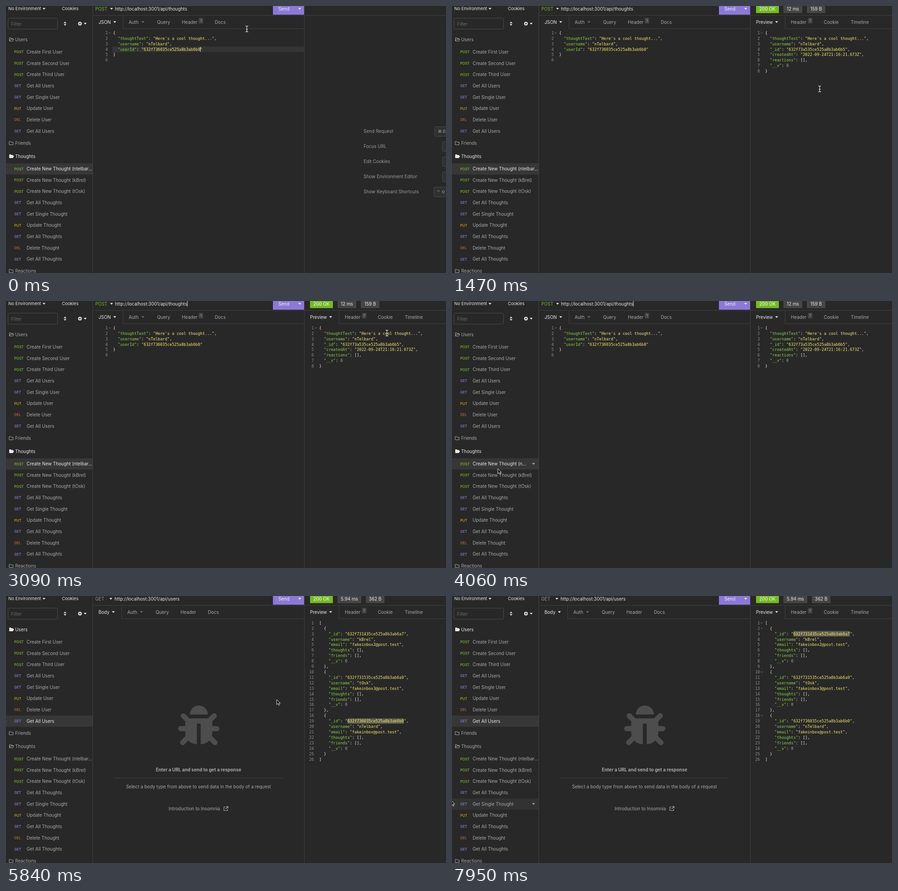
Animation of 961x583 px, one loop 8 s. Source, as an HTML page with a canvas:

```html
<!DOCTYPE html>
<html lang="en">
<head>
<meta charset="utf-8">
<title>API client</title>
<style>
html, body { margin: 0; width: 961px; height: 583px; overflow: hidden; background: #282828; }
canvas { display: block; }
</style>
</head>
<body>
<canvas id="stage" width="961" height="583"></canvas>
<script>
const c = document.getElementById('stage').getContext('2d');
const LOOP = 8000, SEND = 500, REPLY = 560, OPEN_SECOND = 4420, OPEN_USERS = 5450, SELECT = 6740;
const BG = '#282828', LINE = '#404040', DIM = '#a8a8a8', LIGHT = '#e8e8e8', GREEN = '#75ba24';
const METHOD = { POST: '#7fc22e', GET: '#9082dc', PUT: '#d8a81b', DEL: '#c8683c' };
const PITCH = 11.91, UI = 9.85;

const tree = [
  ['Users', 73], ['POST', 'Create First User', 100], ['POST', 'Create Second User', 125],
  ['POST', 'Create Third User', 149.5], ['GET', 'Get All Users', 174], ['GET', 'Get Single User', 199],
  ['PUT', 'Update User', 223.5], ['DEL', 'Delete User', 248], ['GET', 'Get All Users', 273],
  ['Friends', 299.5], ['Thoughts', 328],
  ['POST', 'Create New Thought (ntelbar...', 355.5], ['POST', 'Create New Thought (kBrel)', 380],
  ['POST', 'Create New Thought (tOsk)', 404.5], ['GET', 'Get All Thoughts', 429],
  ['GET', 'Get Single Thought', 454], ['PUT', 'Update Thought', 478.5], ['GET', 'Get All Thoughts', 503],
  ['DEL', 'Delete Thought', 528], ['GET', 'Get All Thoughts', 552.5], ['Reactions', 578.5]
];

const request = (text, user, id) =>
  ['{', `  "thoughtText": "${text}",`, `  "username": "${user}",`, `  "userId": "${id}"`, '}', ''];
const firstBody = request("Here's a cool thought...", 'nTelbard', '632f736035ce525a8b3ab6b0');
const secondBody = request('That new Manor of Badgers episode was great!', 'kBrel', '');
const reply = ['{', '  "thoughtText": "Here\'s a cool thought...",', '  "username": "nTelbard",',
  '  "_id": "632f73a535ce525a8b3ab6b5",', '  "createdAt": "2022-09-24T21:16:21.673Z",',
  '  "reactions": [],', '  "__v": 0', '}'];
const user = (id, name, mail, end) => ['  {', `    "_id": "${id}",`, `    "username": "${name}",`,
  `    "email": "${mail}@post.test",`, '    "thoughts": [],', '    "friends": [],', '    "__v": 0', '  }' + end];
const userList = ['[',
  ...user('632f731435ce525a8b3ab6a7', 'kBrel', 'fakeinbox2', ','),
  ...user('632f731535ce525a8b3ab6a9', 'tOsk', 'fakeinbox3', ','),
  ...user('632f736035ce525a8b3ab6b0', 'nTelbard', 'fakeinbox', ''), ']'];

// Pointer path: time, x, y
const path = [
  [0, 526, 50], [30, 526, 50], [400, 608, 9], [810, 608, 9], [1060, 803, 181], [1470, 803, 181],
  [2160, 820, 110], [2430, 820, 110], [2790, 832, 70], [3090, 832, 70], [3740, 100, 366],
  [4230, 100, 366], [4300, 100, 379], [5060, 100, 379], [5350, 78, 271], [5500, 78, 271],
  [5840, 591, 226], [5870, 652, 200], [6400, 806, 83], [7600, 806, 83], [7950, -2, 446], [8000, -2, 446]
];

function pointerAt(t) {
  const i = Math.max(1, path.findIndex(p => p[0] > t));
  const [t0, x0, y0] = path[i - 1], [t1, x1, y1] = path[i];
  let k = (t - t0) / (t1 - t0);
  k = k * k * (3 - 2 * k);
  return [x0 + (x1 - x0) * k, y0 + (y1 - y0) * k];
}

function text(s, x, y, color = DIM, { size = UI, weight = 400, align = 'left' } = {}) {
  c.font = `${weight} ${size}px Inter, Roboto, "DejaVu Sans", sans-serif`;
  c.textAlign = align;
  c.fillStyle = color;
  c.fillText(s, x, y + size * 0.36);
}

function box(x, y, w, h, color, r = 0) {
  c.fillStyle = color;
  c.beginPath();
  c.roundRect(x, y, w, h, r);
  c.fill();
}

function frame(x, y, w, h, r = 2) {
  c.strokeStyle = '#4a4a4a';
  c.lineWidth = 1;
  c.beginPath();
  c.roundRect(x + .5, y + .5, w, h, r);
  c.stroke();
}

function icon(d, x, y, fill, stroke, width = 1) {
  c.save();
  c.translate(x, y);
  const p = new Path2D(d);
  if (fill) { c.fillStyle = fill; c.fill(p); }
  if (stroke) { c.strokeStyle = stroke; c.lineWidth = width; c.stroke(p); }
  c.restore();
}

const hline = (x, y, x2) => box(x, y, x2 - x, 1, LINE);
const vline = (x, y, y2) => box(x, y, 1, y2 - y, LINE);
const caret = (x, y, color = LIGHT) => icon('M-3.2-1.7h6.4l-3.2 3.8z', x, y, color);

function folder(name, y, open, active) {
  const color = active ? LIGHT : DIM;
  icon(open ? 'M1 3.5V-3.5h3l1 1.3h3.5v1.7M1 3.5L3-.5h7.5l-2 4z' : 'M.5-3.5h3l1 1.3h4.5v5.7h-8.5z',
    6.5, y, active && color, color);
  text(name, 20, y, color);
}

function sidebar(active, users, mx, my) {
  text('No Environment', 5, 6, LIGHT, { size: 9.5 });
  caret(83, 6);
  text('Cookies', 122, 6, LIGHT, { size: 9.5 });
  frame(4, 26, 108, 24);
  text('Filter', 11, 39, '#686868');
  icon('M-3-.9h6l-3-3.6zM-3 .9h6l-3 3.6z', 129, 38.5, LIGHT);
  icon('M-4 0a4 4 0 1 0 8 0a4 4 0 1 0-8 0', 161.5, 38.5, LIGHT);
  icon('M-2.3 0h4.6M0-2.3v4.6', 161.5, 38.5, null, BG, 1.2);
  caret(173, 38.5);
  tree.forEach((row, i) => {
    if (row.length === 2) {
      const [name, y] = row;
      return folder(name, y, name === 'Users' || name === 'Thoughts', name === (users ? 'Users' : 'Thoughts'));
    }
    const [method, name, y] = row;
    const on = i === active, hover = mx < 189 && Math.abs(my - y) < 12.3;
    if (on || hover) box(0, y - 12, 189, 24.5, on ? '#373737' : '#323232');
    text(method, 18, y + .3, METHOD[method], { size: 7.6, weight: 500 });
    text(hover ? name.replace(/(\(.).*/, '$1...') : name, 45, y, on ? LIGHT : DIM);
    if (hover) caret(178, y, DIM);
  });
  vline(189, 0, 583);
}

function count(n, x) {
  box(x, 26, 9.5, 12, '#454545', 1);
  text(n, x + 4.7, 32.2, '#b0b0b0', { size: 7.6, align: 'center' });
}

function requestBar(users, hoverSend, showCaret) {
  text(users ? 'GET' : 'POST', 195, 6, users ? '#999' : GREEN);
  caret(users ? 229 : 230.5, 6);
  const url = 'http://localhost:3001/api/' + (users ? 'users' : 'thoughts');
  const x = users ? 237 : 238;
  text(url, x, 6, LIGHT);
  if (showCaret) box(x + c.measureText(url).width, 0, 1, 12, LIGHT);
  box(583, 0, 68, 19, '#8b79d6');
  if (hoverSend) box(583, 0, 48, 19, '#6a5ba8');
  text('Send', 607, 6, hoverSend ? '#cfc8e8' : '#f0edfa', { align: 'center' });
  caret(641.5, 6, '#f0edfa');
  hline(190, 20, 961);
  const shift = users ? 3 : 0;
  text(users ? 'Body' : 'JSON', 202, 35, LIGHT);
  caret(237.5 - shift, 35);
  vline(255 - shift, 20, 50);
  hline(255 - shift, 49, 651);
  text('Auth', 268 - shift, 35);
  caret(299 - shift, 35, '#707070');
  text('Query', 330 - shift, 35);
  text('Header', 384 - shift, 35);
  if (!users) count('1', 421);
  text('Docs', users ? 441 : 456, 35);
}

function code(lines, x, folds, selected) {
  c.font = '8.54px "DejaVu Sans Mono", "Noto Sans Mono", monospace';
  const cw = c.measureText('0').width;
  lines.forEach((line, i) => {
    const y = 58.8 + i * PITCH;
    c.textAlign = 'right';
    c.fillStyle = '#8e8e8e';
    c.fillText(i + 1, x - 11.5, y + 3);
    c.textAlign = 'left';
    if (folds && /[{[]$/.test(line)) icon('M-2-1l2 2l2-2', x - 7.5, y, null, '#888', .9);
    if (i === selected) box(x + cw * 12, y - 6, cw * 24, PITCH, '#5d5c50');
    for (const m of line.matchAll(/("[^"]*")(?=:)|("[^"]*")|(\d+)|[^"\d]+/g)) {
      c.fillStyle = m[1] ? '#8fd24a' : m[2] ? '#f4ea70' : m[3] ? '#a8a2b6' : '#ececec';
      c.fillText(m[0], x + m.index * cw, y + 3);
    }
  });
  return cw;
}

function emptyBody() {
  const gray = '#4d4d4d';
  c.save();
  c.translate(376, 239);
  c.scale(.176, .176);
  c.lineCap = 'round';
  icon('M145 112a112 112 0 0 1 224 0zM88 197L125 160H387L424 197V336C424 415 360 480 280 480V236' +
    'q0-12-12-12H244q-12 0-12 12V480C152 480 88 415 88 336Z', 0, 0, gray);
  icon('M64 128L120 184M448 128L392 184M32 288H110M480 288H402M55 461L125 392M457 461L387 392',
    0, 0, null, gray, 64);
  c.restore();
  text('Enter a URL and send to get a response', 420.5, 379.5, DIM, { weight: 700, align: 'center' });
  hline(237, 397, 605);
  text('Select a body type from above to send data in the body of a request', 420.5, 416, DIM, { align: 'center' });
  text('Introduction to Insomnia', 355, 464.5);
  icon('M4-3.5H.5v8h8V1M5.5-4.5h4v4M9.5-4.5L4 1', 475.5, 464, null, DIM, 1.2);
}

function shortcuts() {
  const keys = [['Send Request', 936, '⌘ Enter'], ['Focus URL', 953, ''], ['Edit Cookies', 953, ''],
    ['Show Environment Editor', 953, ''], ['Show Keyboard Shortcuts', 934, '⌃ ⇧']];
  keys.forEach(([label, x, key], i) => {
    const y = 273.5 + i * 33.1;
    text(label, 781, y, '#999');
    box(x, y - 10.5, 40, 21, '#303030', 2);
    frame(x, Math.round(y - 11), 40, 21);
    text(key, x + 7, y, DIM, { size: 9 });
  });
}

function responseBar(time, size, wide) {
  const badge = (s, x, w, color, weight) => {
    box(x, -4, w, 19.5, color, 1);
    text(s, x + w / 2, 6, '#ececec', { weight, align: 'center' });
  };
  badge('200 OK', 664, 50, GREEN, 500);
  badge(time, 724, 41 + wide, '#464646', 400);
  badge(size, 775 + wide, 40.5, '#464646', 400);
  text('Preview', 664, 35, LIGHT);
  caret(709, 35);
  vline(727, 20, 50);
  hline(727, 49, 961);
  text('Header', 740, 35);
  count('7', 777.5);
  text('Cookie', 812, 35);
  text('Timeline', 871, 35);
}

function pointer(x, y, beam) {
  if (beam) {
    const d = 'M-3-6.5q3 0 3 2v9q0 2-3 2M3-6.5q-3 0-3 2M0 4.5q0 2 3 2M-1.8 1h3.6';
    icon(d, x, y, null, '#1c1c1c', 3);
    icon(d, x, y, null, '#d8d8d8', 1.3);
  } else {
    icon('M0 0V11.2L2.6 8.8L4.4 12.8L6.3 12L4.6 8.1H8z', x, y, '#161616', '#dedede', 1);
  }
}

function draw(now) {
  const t = now % LOOP;
  const [mx, my] = pointerAt(t);
  const users = t >= OPEN_USERS, second = !users && t >= OPEN_SECOND;
  const replied = t >= REPLY && !second;
  const blink = t >= SEND && !users && (t < 1460 || second || (t - 1460) % 1000 >= 500);

  box(0, 0, 961, 583, BG);
  sidebar(users ? 8 : second ? 12 : 11, users, mx, my);
  requestBar(users, mx >= 583 && mx < 632 && my < 20, blink);

  if (users) {
    emptyBody();
  } else {
    const editing = t < SEND;
    if (editing) box(232, 88.5, 419, PITCH, '#343434');
    const cw = code(second ? secondBody : firstBody, 234, !second);
    if (editing) box(234 + cw * 37, 89, 1, 11, LIGHT);
  }

  vline(651, 0, 583);
  if (users) {
    responseBar('5.94 ms', '362 B', 11);
    code(userList, 684, t >= 5900, t < SELECT ? 18 : 2);
  } else if (replied) {
    responseBar('12 ms', '159 B', 0);
    code(reply, 684, t >= 900);
  } else {
    shortcuts();
  }

  const overEditor = !users && mx > 190 && mx < 651, overReply = replied && mx > 652;
  pointer(mx, my, my > 48 && (overEditor || overReply));
  requestAnimationFrame(() => draw(performance.now()));
}
draw(performance.now());
</script>
</body>
</html>
```
